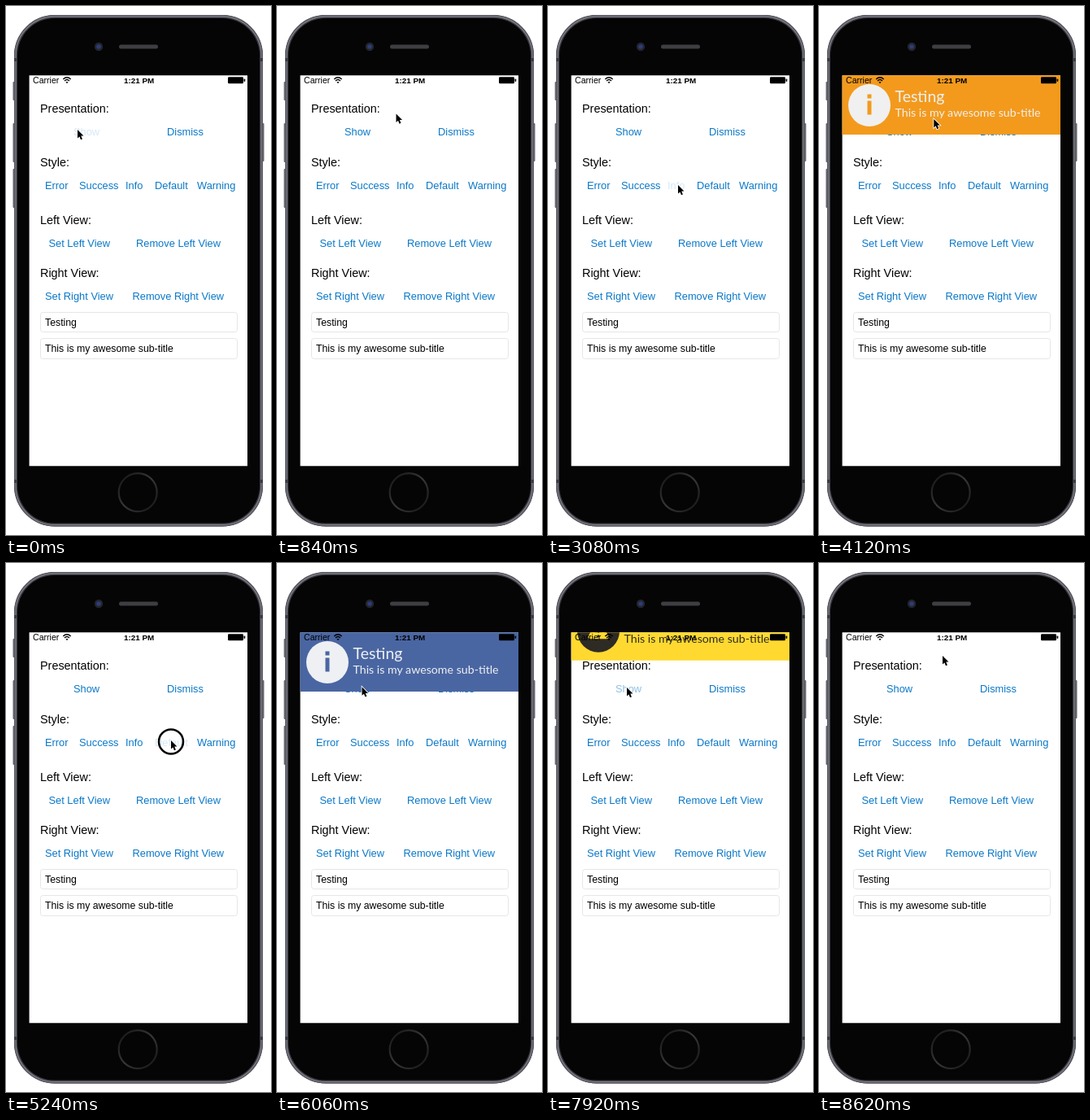
Write an HTML page that moves like this. It is 326 px wide and 650 px high and loops after 8.64 s.

```html
<!DOCTYPE html>
<html lang="en">
<head>
<meta charset="utf-8">
<title>Drop-down notification demo</title>
<style>
html, body { margin: 0; width: 100%; height: 100%; overflow: hidden; background: #fff; }
svg { display: block; width: 326px; height: 650px; font-family: "Liberation Sans", Arial, sans-serif; }
.head { font-size: 14.4px; }
.btn { font-size: 12.85px; fill: #0a78c8; }
.field { font-size: 12.3px; }
.note { font-family: Lato, sans-serif; }
</style>
</head>
<body>
<svg viewBox="0 0 326 650">
  <defs>
    <linearGradient id="home" x2="1" y2="1">
      <stop offset="0" stop-color="#141416"/><stop offset=".5" stop-color="#38383b"/><stop offset="1" stop-color="#141416"/>
    </linearGradient>
    <clipPath id="screen"><path d="M28.6 85.3H297V565.3H28.6z"/></clipPath>
  </defs>

  <g fill="#64646c">
    <rect x="8.5" y="93" width="4" height="23" rx="1"/>
    <rect x="8.5" y="144" width="4" height="48" rx="1"/>
    <rect x="8.5" y="200" width="4" height="48" rx="1"/>
    <rect x="313.5" y="144" width="4" height="47" rx="1"/>
  </g>
  <rect x="10" y="11" width="306" height="628.5" rx="50" fill="#3a3a40"/>
  <g fill="none">
    <rect x="10.6" y="11.6" width="304.8" height="627.3" rx="49.4" stroke="#5a5a63" stroke-width="1.2"/>
    <rect x="12" y="13" width="302" height="624.5" rx="48" stroke="#7d7d87" stroke-width="1.4"/>
  </g>
  <path d="M10 66h4M312 66h4M10 584h4M312 584h4" stroke="#3c3c44" stroke-width="4"/>
  <rect x="14" y="15" width="298" height="620.5" rx="46" fill="#050506"/>
  <circle cx="114" cy="50" r="5.2" fill="#24252c"/>
  <circle cx="114" cy="50" r="2.8" fill="#2b3d78"/>
  <rect x="139" y="47.5" width="48" height="5" rx="2.5" fill="#3e3e41"/>
  <circle cx="162.2" cy="597.7" r="23.5" fill="#050506" stroke="url(#home)" stroke-width="2.2"/>
  <path d="M28.6 85.3H297V565.3H28.6z" fill="#fff"/>

  <g id="labels"></g>
  <g fill="none" stroke="#e6e6e6">
    <rect x="42.5" y="376.5" width="242" height="24" rx="3"/>
    <rect x="42.5" y="408.5" width="242" height="25" rx="3"/>
  </g>

  <g clip-path="url(#screen)">
    <g id="banner">
      <path id="panel" d="M28 85h270v73H28z"/>
      <g id="ink" class="note">
        <circle cx="62" cy="122" r="26"/>
        <text x="93.5" y="118" font-size="19.5">Testing</text>
        <text x="93.5" y="136" font-size="14.2">This is my awesome sub-title</text>
      </g>
      <path id="icon" fill="none" stroke-width="5"/>
      <path id="mark" fill="none" stroke-width="3" stroke-linecap="round"/>
    </g>
  </g>

  <text x="33" y="95" font-size="10.6">Carrier</text>
  <text x="145" y="95" font-size="9.9" font-weight="bold">1:21 PM</text>
  <g fill="none" stroke="#000" stroke-width="1.4">
    <path d="M70.3 90q4.7-4.4 9.4 0M72 92q3-2.8 6 0"/>
    <path d="M75 95.2l-1.5-1.8q1.5-1 3 0z" fill="#000" stroke="none"/>
  </g>
  <rect x="273" y="87.3" width="19" height="8" rx="1.2"/>
  <rect x="292.6" y="89.6" width="1.6" height="3.4" rx=".7"/>

  <g id="cursor">
    <circle id="ring" cy="1.5" r="15" fill="none" stroke="#000" stroke-width="2.5"/>
    <path d="M0 0V10.5L2.4 8.4 4 12.2 5.9 11.4 4.3 7.6H7.5Z" stroke="#fff" stroke-width="1.6" paint-order="stroke"/>
  </g>
</svg>
<script>
const LOOP = 8640;
const $ = id => document.getElementById(id);
const clamp = p => Math.min(1, Math.max(0, p));
const smooth = p => p * p * (3 - 2 * p);
const easeOut = p => 1 - (1 - p) ** 2;

const buttons = {};
function label(cls, x, y, text) {
  const el = document.createElementNS("http://www.w3.org/2000/svg", "text");
  el.setAttribute("class", cls);
  el.setAttribute("x", x);
  el.setAttribute("y", y);
  el.textContent = text;
  $("labels").append(el);
  if (cls === "btn") buttons[text] = el;
}
[[42, 131, "Presentation:"], [42, 197, "Style:"], [42, 268, "Left View:"], [42, 333, "Right View:"]]
  .forEach(a => label("head", ...a));
[[83, 159, "Show"], [198, 159, "Dismiss"],
 [48, 225, "Error"], [90, 225, "Success"], [147, 225, "Info"], [183, 225, "Default"], [235, 225, "Warning"],
 [52.5, 296, "Set Left View"], [160, 296, "Remove Left View"],
 [48, 361, "Set Right View"], [155.5, 361, "Remove Right View"]]
  .forEach(a => label("btn", ...a));
[[48, 393, "Testing"], [48, 425, "This is my awesome sub-title"]]
  .forEach(a => label("field", ...a));

const letterI = "M62 108.5v5M62 116.5v17";
const styles = {
  error: ["#e8432e", "#f0f0f0", "M53 113l18 18M71 113l-18 18"],
  success: ["#10cd73", "#ecf3ef", "M51 122l8 8 15-17"],
  info: ["#f39a1d", "#f0f0f0", letterI],
  plain: ["#4a66a2", "#eef0f4", letterI],
  warning: ["#ffd930", "#2e2b24", "M62 110l-10 19h20z", "M62 114.5v8M62 128v.1"]
};

// style, Show pressed, banner tapped
const shows = [
  ["error", -80, 620], ["success", 1690, 2350], ["info", 3590, 4440],
  ["plain", 5740, 6463], ["warning", 7785, 8370]
];
const presses = [
  ...shows.map(s => [s[1], "Show"]), ...shows.map(s => [s[2]]),
  [1190, "Success"], [2990, "Info"], [5190, "Default"], [7090, "Warning"]
];

// time, x, y of the pointer tip
const path = [
  [0, 88, 152], [250, 88, 152], [560, 152, 118], [760, 152, 118],
  [1100, 114, 219], [1320, 114, 219], [1640, 98, 157], [2000, 98, 157],
  [2280, 160, 118], [2520, 160, 118], [2900, 160, 220], [3160, 160, 220],
  [3520, 98, 154], [3900, 98, 154], [4360, 190, 122], [4640, 190, 122],
  [5080, 203, 218], [5320, 203, 218], [5680, 98, 154], [6000, 98, 154],
  [6400, 202, 127], [6640, 202, 127], [7000, 258, 219], [7240, 258, 219],
  [7680, 97, 153], [8020, 97, 153], [8310, 152, 114], [LOOP, 152, 114]
];

function pointer(t) {
  const i = path.findIndex(k => k[0] > t);
  const [t0, x0, y0] = path[i - 1], [t1, x1, y1] = path[i];
  const p = smooth((t - t0) / (t1 - t0));
  return [x0 + (x1 - x0) * p, y0 + (y1 - y0) * p];
}

function drawBanner(t) {
  const [name, start, tap] = shows.findLast(s => t >= s[1]);
  const enter = easeOut(clamp((t - start - 94) / 150));
  const leave = smooth(clamp((t - tap - 80) / 120));
  const [main, ink, icon, mark] = styles[name];
  $("banner").setAttribute("transform", `translate(0 ${74 * (enter - leave - 1)})`);
  $("panel").setAttribute("fill", main);
  $("ink").setAttribute("fill", ink);
  $("icon").setAttribute("d", icon);
  $("icon").setAttribute("stroke", main);
  $("icon").setAttribute("fill", mark ? main : "none");
  $("icon").setAttribute("stroke-linejoin", mark ? "round" : "miter");
  $("mark").setAttribute("d", mark || "");
  $("mark").setAttribute("stroke", ink);
}

function draw(t) {
  drawBanner(t);
  for (const name in buttons) buttons[name].style.opacity = 1;
  let down = false;
  for (const [start, name] of presses) {
    const age = t - start;
    if (age < 0 || age > 200) continue;
    if (age < 80) down = true;
    if (name) buttons[name].style.opacity = 0.17 + 0.83 * clamp((age - 100) / 100);
  }
  $("ring").style.display = down ? "" : "none";
  $("cursor").setAttribute("transform", `translate(${pointer(t)})`);
}

const begin = performance.now();
function tick() {
  draw((performance.now() - begin) % LOOP);
  requestAnimationFrame(tick);
}
tick();
</script>
</body>
</html>
```
